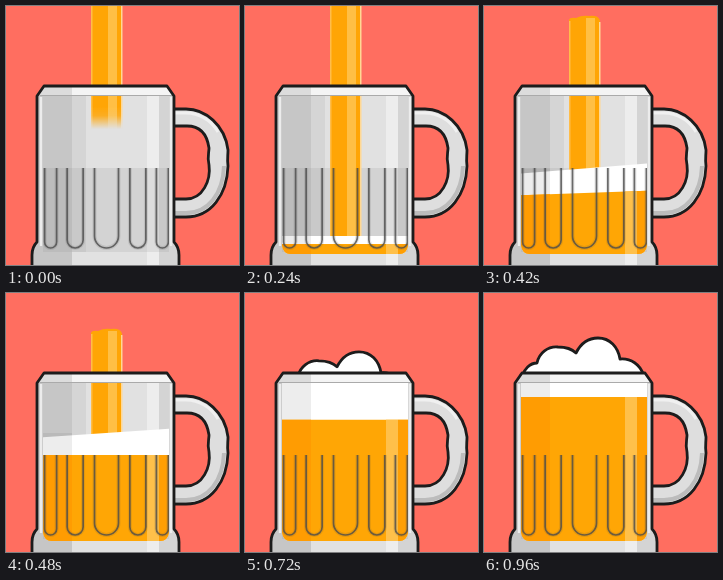
These frames come from a looping animation (233 px wide and 259 px high, 1320 ms). An HTML page:

```html
<!DOCTYPE html>
<html lang="en">
<head>
<meta charset="utf-8">
<title>Filling a beer mug</title>
<style>
html, body { margin: 0; width: 100%; height: 100%; overflow: hidden; background: #ff6e60; }
svg { display: block; width: 100vw; height: 100vh; }
</style>
</head>
<body>
<svg viewBox="0 0 233 259">
  <defs>
    <clipPath id="inside"><path d="M37 89H163V239Q162 248 154 248H46Q38 248 37 239Z"/></clipPath>
    <clipPath id="aboveRim"><path d="M0 0H233V82H0Z"/></clipPath>
    <clipPath id="body"><path id="bodyShape" d="M38 80H161L168 90V236Q173 241 173 249V264H26V249Q26 241 31 236V90Z"/></clipPath>
    <clipPath id="beerClip"><path id="beer"/></clipPath>
    <linearGradient id="fade" x1="0" y1="0" x2="0" y2="1">
      <stop offset="0" stop-color="#fff"/>
      <stop offset=".4" stop-color="#ddd"/>
      <stop offset="1" stop-color="#000"/>
    </linearGradient>
    <mask id="tipMask" maskUnits="userSpaceOnUse" x="80" y="80" width="45" height="180">
      <g id="tip">
        <rect x="80" y="-200" width="45" height="178" fill="#fff"/>
        <rect x="80" y="-22" width="45" height="22" fill="url(#fade)"/>
      </g>
    </mask>
  </defs>
  <rect width="233" height="259" fill="#ff6e60"/>

  <!-- handle -->
  <path d="M166 103H180C199 103 219 119 222 144C222 150 221 154 222 160C221 189 205 211 180 211H166V193H180C197 193 205 174 203 159C201 151 203 147 203 142C201 128 194 120 181 120H166Z" fill="#dedede" stroke="#1c1c1c" stroke-width="2.8"/>
  <path d="M169 207H180C202 207 217 188 218 160" fill="none" stroke="#bcbcbc" stroke-width="4"/>
  <path d="M169 107H180C193 107 205 114 212 126" fill="none" stroke="#f0f0f0" stroke-width="3"/>

  <g clip-path="url(#aboveRim)">
    <path id="head" d="M38 130V84C40 76 46 70 53 70C55 60 64 53 74 54C82 54 88 56 92 60C97 50 105 45 114 45C126 45 134 54 136 66C146 65 157 71 160 84V130Z" fill="#fff" stroke="#1c1c1c" stroke-width="2.8" stroke-linejoin="round"/>
    <g class="stream"></g>
  </g>

  <!-- glass -->
  <g clip-path="url(#body)">
    <rect x="24" y="80" width="152" height="180" fill="#e1e1e1"/>
    <rect x="24" y="80" width="42" height="180" fill="#c6c6c6"/>
    <rect x="66" y="89" width="14" height="157" fill="#d5d5d5"/>
    <rect x="141" y="89" width="12" height="170" fill="#ededed"/>
    <rect x="153" y="89" width="24" height="170" fill="#d4d4d4"/>
    <rect x="37" y="162" width="126" height="84" fill="#888" opacity=".16"/>
  </g>
  <g clip-path="url(#inside)">
    <g class="stream" mask="url(#tipMask)"></g>
    <path id="foam" fill="#fff"/>
    <rect id="foamShade" x="37" width="29" height="170" fill="#555" opacity=".1"/>
    <g clip-path="url(#beerClip)">
      <rect x="37" y="89" width="126" height="160" fill="#ffa605"/>
      <rect x="37" y="89" width="29" height="160" fill="#ff9c02"/>
      <rect x="141" y="89" width="12" height="160" fill="#ffc04a"/>
      <rect x="153" y="89" width="11" height="160" fill="#ff9f04"/>
    </g>
    <g id="flutes" fill="none" stroke="#4c4c4c"></g>
  </g>
  <path d="M35 91V240M165 91V240" stroke="#ececec" stroke-width="2.4"/>
  <path d="M39 81H160L166 89H33Z" fill="#f4f4f4"/>
  <path d="M39 81H66V89H33Z" fill="#dcdcdc"/>
  <path d="M34 89.5H166" stroke="#aaa" stroke-width="1.2"/>
  <use href="#bodyShape" fill="none" stroke="#1c1c1c" stroke-width="2.8" stroke-linejoin="round"/>
</svg>
<script>
const LOOP = 1320, STEP = 60, LAST = 16, FILL_START = 4;
const $ = id => document.getElementById(id);
const set = (id, name, value) => $(id).setAttribute(name, value);

// Flutes crowd together and narrow towards the sides of the round glass.
function flute(k) {
  const x = 100.5 + 69 * Math.sin(k * 0.472);
  const r = 12 / (1 + Math.abs(k) / 2);
  return `M${x - r} 162V${242 - r}A${r} ${r} 0 0 0 ${x + r} ${242 - r}V162`;
}
const flutePath = [-2, -1, 0, 1, 2].map(flute).join("");
$("flutes").innerHTML =
  `<path d="${flutePath}" stroke-width="4" opacity=".14"/>` +
  `<path d="${flutePath}" stroke-width="1.7" opacity=".8"/>`;

const bar = (x, w, y, fill) =>
  `<rect x="${x}" y="${y}" width="${w}" height="280" fill="${fill}"/>`;

const stream = top =>
  `<path d="M85 280V${top + 4}Q86 ${top + 1} 92 ${top + 2}Q98 ${top - 1} 105 ${top}Q115 ${top - 1} 116 ${top + 5}V280Z" fill="#ffa505"/>` +
  bar(85, 1.5, top + 5, "#ffbd4a") + bar(102, 9, top + 2, "#ffbf45") +
  bar(115, 1.5, top + 6, "#ffd894");

const surface = (y, tilt) => `M37 ${y - tilt / 2}L163 ${y + tilt / 2}V260H37Z`;

// Beer rises faster and faster, then settles once the stream stops.
function beerLevel(d) {
  if (d < 0) return 260;
  if (d <= 4) return 238 - 11 * d - 2 * d * d;
  return 104 + 58 * (1 - (d - 4) / 8) ** 1.35;
}

function draw(ms) {
  const s = Math.min(LAST, Math.floor(ms / STEP)), d = s - FILL_START;
  const foamY = d < 0 ? 260 : Math.max(89, 230 - 22.5 * d);
  const foamTilt = d > 0 && d < 6 ? -10 * Math.sin(d * Math.PI / 6) : 0;
  const beerTilt = d > 0 ? -9.5 * Math.exp(-0.14 * d) * Math.sin(d * Math.PI / 4) : 0;
  set("foam", "d", surface(foamY, foamTilt));
  set("foamShade", "y", foamY);
  set("beer", "d", surface(beerLevel(d), beerTilt));

  const pour = stream(Math.max(-10, 36 + 26 * (s - 8)));
  document.querySelectorAll(".stream").forEach(g => g.innerHTML = pour);
  set("tip", "transform", `translate(0 ${d < 0 ? 123 + 30 * s : 290})`);
  set("head", "transform", `translate(0 ${31 * ((LAST - s) / 6) ** 2})`);
}

const start = performance.now();
function tick() {
  draw((performance.now() - start) % LOOP);
  requestAnimationFrame(tick);
}
tick();
</script>
</body>
</html>
```
